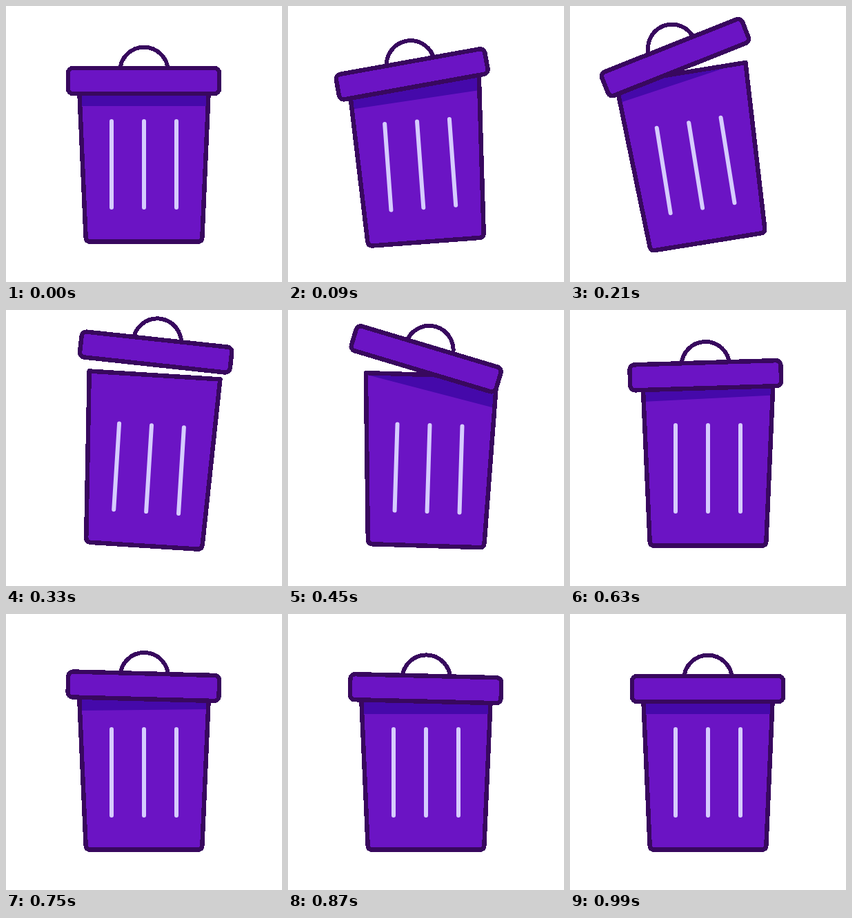
Write an HTML page that moves like this. It is 400x400 px and loops after 3020 ms.

```html
<!DOCTYPE html>
<html lang="en">
<head>
<meta charset="utf-8">
<title>Trash can</title>
<style>
  html, body { margin: 0; height: 100%; overflow: hidden; background: #fff; }
  svg { display: block; width: 100%; height: 100%; }
  .line { stroke: #38085e; stroke-width: 6.5; stroke-linejoin: round; shape-rendering: crispEdges; }
  .fill { fill: #6b14c4; }
</style>
</head>
<body>
<svg viewBox="0 0 400 400">
  <defs>
    <path id="shape" d="M105 94H295L284.4 335Q284 341.7 278 341.7H122Q116 341.7 115.6 335Z"/>
    <clipPath id="inside"><use href="#shape"/></clipPath>
    <clipPath id="above"><rect x="150" y="40" width="100" height="60"/></clipPath>
  </defs>
  <g id="can">
    <use href="#shape" class="fill"/>
    <g clip-path="url(#inside)">
      <rect id="shade" x="-100" y="-155" width="600" height="300" fill="#4509aa"/>
    </g>
    <use href="#shape" class="line" fill="none"/>
    <path d="M153 167V292M200 167V292M247 167V292" stroke="#d6ccff" stroke-width="6" stroke-linecap="round"/>
    <g id="lid">
      <circle cx="200" cy="94.5" r="34.8" fill="none" class="line" style="stroke-width:6" clip-path="url(#above)"/>
      <rect x="90" y="90" width="219" height="37" rx="7" class="fill line"/>
    </g>
  </g>
</svg>
<script>
const LOOP = 3020, STEP = 30, END = 990;

const ease = (t, from, to) => {
  const u = Math.min(1, Math.max(0, (t - from) / (to - from)));
  return u * u * (3 - 2 * u);
};
// Eases from 0 up to 1 at the peak, then back to 0
const pulse = (t, from, peak, to) => ease(t, from, peak) * (1 - ease(t, peak, to));

const [can, lid, shade] = ["can", "lid", "shade"].map(id => document.getElementById(id));
const place = (el, x, y, turn, cx, cy) =>
  el.setAttribute("transform", `translate(${x} ${y}) rotate(${turn} ${cx} ${cy})`);

function draw(t) {
  // The can rocks left, then right, and settles
  const rockLeft = pulse(t, 0, 195, 330);
  place(can, 0, 0, 3.6 * pulse(t, 195, 330, 570) - 9.6 * rockLeft, 200, 342);

  // The lid pops up, falls back and wobbles ever less
  const lift = 48.5 * ease(t, 0, 300) * (1 - ease(t, 300, END)) ** 2;
  const drift = 4 * rockLeft + 7.8 * pulse(t, 330, 450, 770);
  const tilt = 14.9 * pulse(t, 190, 450, 660) - 13 * pulse(t, 0, 190, 450)
    + 2.3 * pulse(t, 660, 780, END) - 2.7 * pulse(t, 450, 660, 780);
  place(lid, -drift, -lift, tilt, 199.5, 108.5);

  // The shadow follows the lid loosely
  const rise = 56 * pulse(t, 0, 340, 450) + 27 * pulse(t, 340, 450, 880);
  const slant = 12.8 * pulse(t, 280, 450, 630) - 9.5 * rockLeft - 2.8 * pulse(t, 450, 630, 800);
  place(shade, 0, -rise, slant, 200, 145);
}

const start = performance.now();
function tick() {
  const t = (performance.now() - start) % LOOP;
  draw(Math.min(END, Math.floor(t / STEP) * STEP));
  requestAnimationFrame(tick);
}
tick();
</script>
</body>
</html>
```
